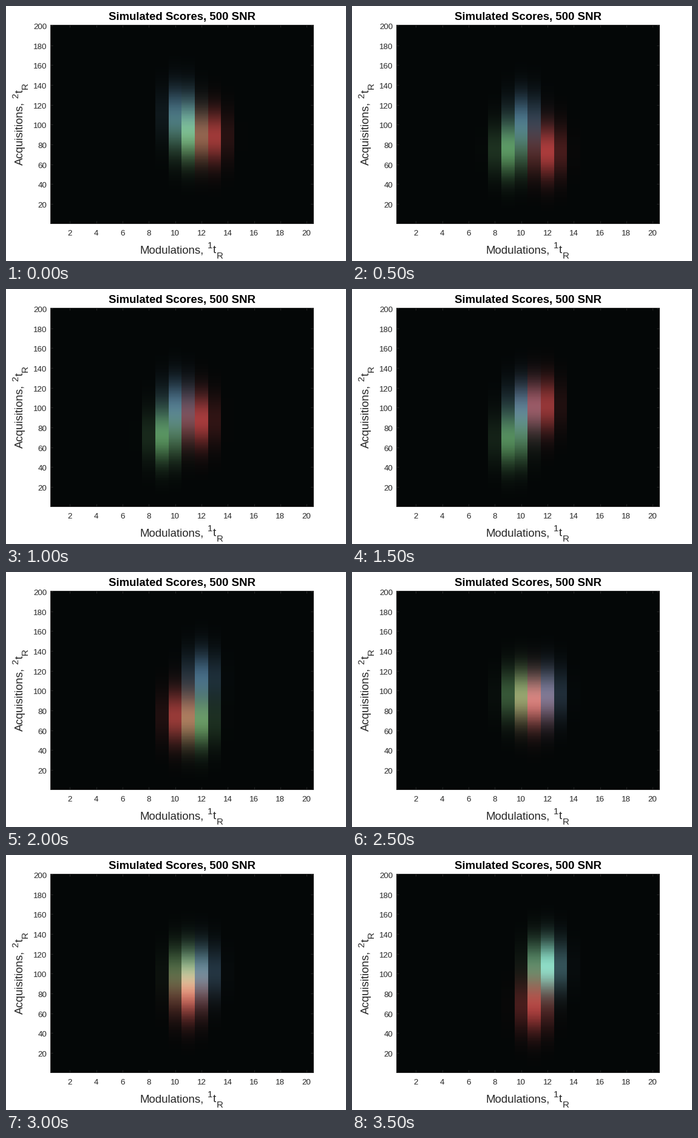
Write a matplotlib script that moves like this. It is 560 px wide and 420 px high and loops after 4 s.

```python
import numpy as np
import matplotlib.pyplot as plt
from matplotlib.animation import FuncAnimation

W, H, DPI = 560, 420, 80
PX = 72 / DPI                      # points per pixel
INK = "#262626"
LEFT, RIGHT, TOP, BOTTOM = 73, 506, 31, 358
N_MOD, N_ACQ = 20, 200
STEPS, STEP_S = 8, 0.5

SIGMA_X, SIGMA_Y = 0.74, 19
BACK = (4, 7, 7)
cols = np.arange(1, N_MOD + 1)
rows = np.arange(1, N_ACQ + 1)

# each compound wanders between (modulation, acquisition) points
KEY_S = (0, 0.5, 1.5, 2, 2.5, 3.5)
RED = [(12.7, 88), (12.0, 73), (11.6, 102), (10.4, 74), (11.0, 89), (11.0, 68)]
GREEN = [(11.0, 89), (9.15, 75), (9.35, 68), (11.8, 69), (9.8, 96), (11.6, 108)]
BLUE = [(10.4, 112), (10.2, 104), (10.1, 100), (12.0, 113), (12.0, 97), (12.2, 107)]

# path, brightness and tint of each compound
COMPOUNDS = [(RED, 165, (1, 0.31, 0.31)),
             (GREEN, 140, (0.60, 1, 0.60)),
             (BLUE, 120, (0.50, 0.77, 1))]


def bell(v, mid, sigma):
    return np.exp(-((v - mid) ** 2) / (2 * sigma ** 2))


def render(i):
    img = np.zeros((N_ACQ, N_MOD, 3)) + BACK
    for path, peak, tint in COMPOUNDS:
        x, y = (np.interp(i * STEP_S, KEY_S, axis) for axis in zip(*path))
        score = peak * np.outer(bell(rows, y, SIGMA_Y), bell(cols, x, SIGMA_X))
        img += score[..., None] * tint
    return np.clip(img, 0, 255).astype(np.uint8)


fig = plt.figure(figsize=(W / DPI, H / DPI), dpi=DPI, facecolor="white")


def put(x, y, text, size=18.67, **kw):
    """Place text with its baseline at a pixel position from the top left."""
    style = dict(family="Liberation Sans", color=INK, va="baseline", ha="left")
    style.update(kw)
    fig.text(x / W, 1 - y / H, text, fontsize=size * PX, **style)


ax = fig.add_axes([LEFT / W, 1 - BOTTOM / H,
                   (RIGHT - LEFT) / W, (BOTTOM - TOP) / H])
picture = ax.imshow(render(0), origin="lower", aspect="auto",
                    interpolation="nearest",
                    extent=(0.5, N_MOD + 0.5, 0.5, N_ACQ + 0.5))
ax.set_xticks(range(2, N_MOD + 1, 2))
ax.set_yticks(range(20, N_ACQ + 1, 20))
ax.tick_params(direction="in", length=4.3 * PX, width=PX, color=INK,
               top=True, right=True, labelbottom=False, labelleft=False)
for spine in ax.spines.values():
    spine.set(color=INK, linewidth=PX)

for v in ax.get_xticks():
    x = LEFT + (v - 0.5) * (RIGHT - LEFT) / N_MOD
    put(x, 378, f"{v:.0f}", 13.33, ha="center")
for v in ax.get_yticks():
    y = BOTTOM - (v - 0.5) * (BOTTOM - TOP) / N_ACQ
    put(67.5, y + 6, f"{v:.0f}", 13.33, ha="right")

put(290, 23, "Simulated Scores, 500 SNR", color="black",
    weight="bold", ha="center")

put(221, 407, "Modulations,")
put(332, 399, "1", 15)
put(341, 407, "t")
put(347, 416, "R", 15)

up = dict(rotation=90, rotation_mode="anchor")
put(28, 262, "Acquisitions,", **up)
put(20, 152, "2", 15, **up)
put(28, 143, "t", **up)
put(36, 137, "R", 15, **up)


def update(i):
    picture.set_data(render(i))
    return (picture,)


anim = FuncAnimation(fig, update, frames=STEPS, interval=1000 * STEP_S,
                     repeat=True, repeat_delay=0, blit=False)
plt.show()
```
